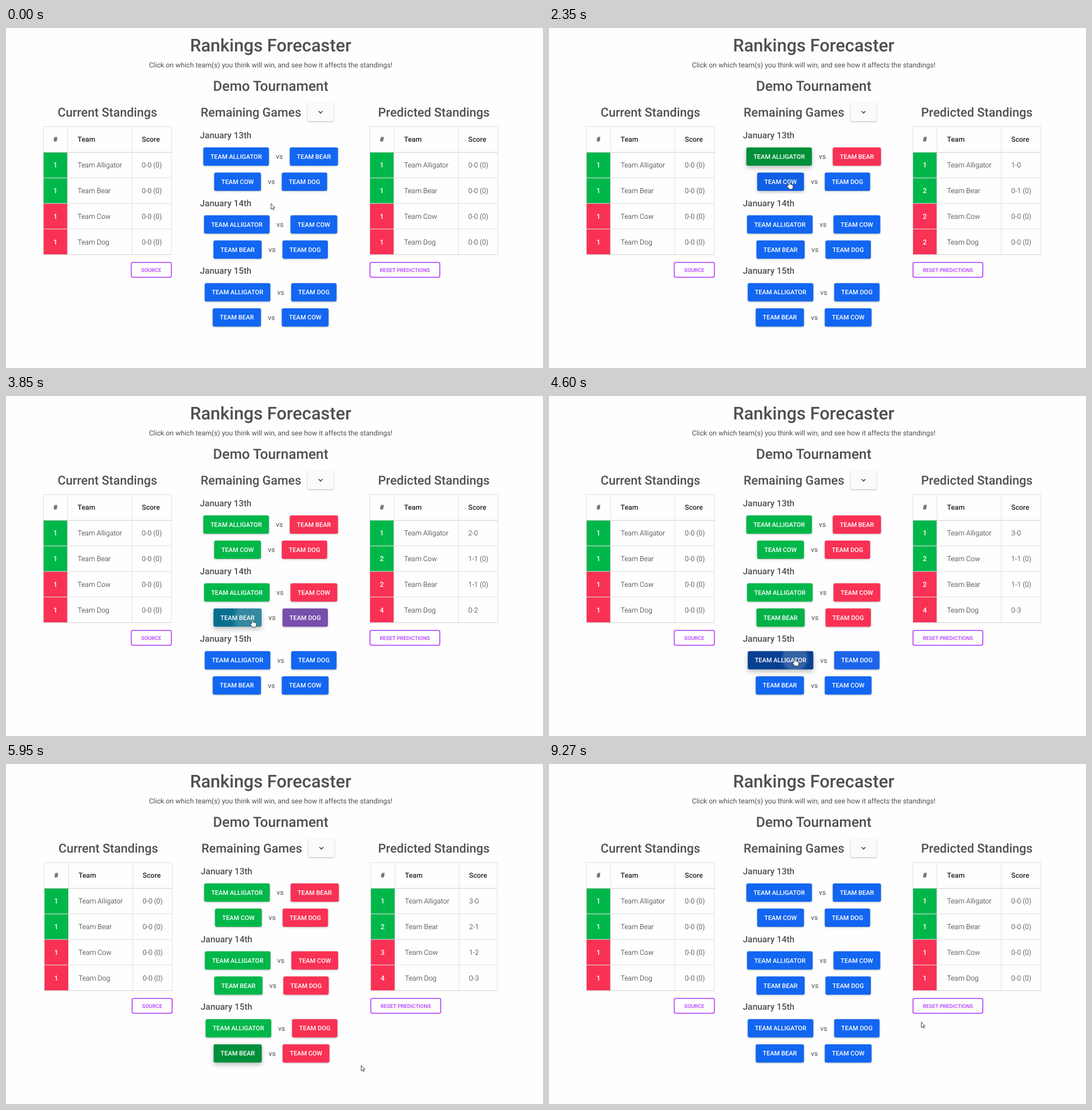
These frames come from a looping animation (941 by 595 pixels, 9940 ms). An HTML page:

```html
<!DOCTYPE html>
<html lang="en">
<head>
<meta charset="utf-8">
<title>Rankings Forecaster</title>
<style>
  html, body { margin: 0; width: 100%; height: 100%; overflow: hidden; background: #fefefe; }
  svg { display: block; font-family: Roboto, sans-serif; text-rendering: geometricPrecision; }
</style>
</head>
<body>
<svg id="stage" width="941" height="595" viewBox="0 0 941 595"></svg>
<script>
const LOOP = 9940;
const INK = '#4f4f4f', DARK = '#212529', LINE = '#dfdfdf', VIOLET = '#b23cfd';
const GREEN = [0, 183, 74], RED = [249, 49, 84], BLUE = [18, 102, 241];
const DARK_GREEN = [0, 143, 58], DARK_BLUE = [12, 86, 208];

const TEAMS = ['Alligator', 'Bear', 'Cow', 'Dog'];
const BUTTON_WIDTH = { Alligator: 115, Bear: 84.5, Cow: 82, Dog: 79.5 };
// The first team of each game is the one that gets picked.
const GAMES = [
  ['Alligator', 'Bear'], ['Cow', 'Dog'],
  ['Alligator', 'Cow'], ['Bear', 'Dog'],
  ['Alligator', 'Dog'], ['Bear', 'Cow'],
];

// Times in ms
const HOVER = [1070, 2290, 2900, 3510, 4050, 4910];
const PRESS = [1510, 2400, 3170, 3660, 4470, 5090];
const HOLD = 125, FADE = 150, RIPPLE = 500;
const RESET_HOVER = 7800, RESET_PRESS = 8410, RESET = RESET_PRESS + HOLD;

// Cursor moves: start, end, x, y
const CURSOR_START = [464, 307];
const MOVES = [
  [620, 1190, 420.5, 240.5],
  [2170, 2390, 421, 271],
  [2780, 3000, 432, 341],
  [3400, 3620, 432, 391],
  [3900, 4150, 431, 459],
  [4760, 5040, 427.5, 498.5],
  [5490, 5950, 622, 527],
  [7050, 7920, 655, 426],
  [8800, 9270, 652, 451],
];

const ramp = (t, start, length) => Math.min(1, Math.max(0, (t - start) / length));
const ease = k => k * k * (3 - 2 * k);
const mix = (a, b, k) => a + (b - a) * k;
const mixColor = (a, b, k) => a.map((v, i) => mix(v, b[i], k));
const rgb = c => `rgb(${c.map(Math.round)})`;

// Text is placed by the middle of its capitals.
function label(str, x, middle, size, weight = 500, fill = INK, anchor = 'middle') {
  return `<text x="${x}" y="${middle + size * .355}" font-size="${size}" font-weight="${weight}" fill="${fill}" text-anchor="${anchor}">${str}</text>`;
}

function rect(x, y, w, h, fill, extra = '') {
  return `<rect x="${x}" y="${y}" width="${w}" height="${h}" fill="${fill}" ${extra}/>`;
}

function raised(x, y, w, h, fill, lift = 0) {
  const shadow = `drop-shadow(0 ${mix(1.5, 4, lift)}px ${mix(1.8, 4, lift)}px rgba(0,0,0,${mix(.27, .25, lift)}))`;
  return rect(x, y, w, h, fill, `rx="3" style="filter:${shadow}"`);
}

// Standings after each pick; ties keep their previous order.
function simulate() {
  let rows = TEAMS.map(team => ({ team, wins: 0, losses: 0 }));
  const history = [rows];
  for (const [winner, loser] of GAMES) {
    rows = rows.map(r => ({
      team: r.team,
      wins: r.wins + (r.team === winner),
      losses: r.losses + (r.team === loser),
    })).sort((a, b) => b.wins - a.wins);
    history.push(rows);
  }
  return history;
}
const HISTORY = simulate();

function table(left, width, rows) {
  const top = 172.5, head = 45, rowHeight = 44.75;
  const bottom = top + head + 4 * rowHeight;
  const textX = left + 60, scoreX = left + 172.5, rankX = left + 21;
  let out = label('#', rankX, 195, 12.3, 500, DARK)
    + label('Team', textX, 195, 12.3, 500, DARK, 'start')
    + label('Score', scoreX, 195, 12.3, 500, DARK, 'start');
  let lines = `M${left} ${top}h${width}V${bottom}h${-width}Z M${left + 42.5} ${top}V${bottom}M${left + 155} ${top}V${bottom}`;
  rows.forEach((row, i) => {
    const y = top + head + i * rowHeight, middle = y + 22.5;
    const rank = 1 + rows.filter(r => r.wins > row.wins).length;
    const tied = rows.filter(r => r.wins === row.wins).length > 1;
    out += rect(left, y, 42, rowHeight, rgb(i < 2 ? GREEN : RED))
      + label(rank, rankX, middle, 12.3, 500, '#fff')
      + label('Team ' + row.team, textX, middle, 12.3, 300, DARK, 'start')
      + label(`${row.wins}-${row.losses}${tied ? ' (0)' : ''}`, scoreX, middle, 12.3, 300, DARK, 'start');
    lines += `M${left} ${y}h${width}`;
  });
  return out + `<path d="${lines}" fill="none" stroke="${LINE}"/>`
    + `<path d="M${left} ${top + head}h${width}M${left} ${bottom}h${width}" stroke="#cfcfcf"/>`;
}

function outlineButton(str, box, tint = 0) {
  const { x, y, w, h } = box;
  return rect(x + .8, y + .8, w - 1.6, h - 1.6, `rgba(0,0,0,${.03 * tint})`, `rx="2.6" stroke="${VIOLET}" stroke-width="1.6"`)
    + label(str, x + w / 2, y + h / 2, 9.25, 500, VIOLET);
}

function gameBoxes(i, shift) {
  const [a, b] = GAMES[i].map(team => BUTTON_WIDTH[team]);
  const x = 463.75 + shift - (a + 36.5 + b) / 2;
  const y = 209 + Math.floor(i / 2) * 118.75 + (i % 2) * 44;
  return [{ x, y, w: a, h: 32 }, { x: x + a + 36.5, y, w: b, h: 32 }];
}

function ripple(t, start, box, color, strength) {
  const age = t - start;
  if (age < 0 || age > RIPPLE) return '';
  const [x, y] = cursorAt(start);
  const opacity = strength * (1 - ramp(age, RIPPLE * .5, RIPPLE * .5));
  return `<clipPath id="clip${start}"><rect x="${box.x}" y="${box.y}" width="${box.w}" height="${box.h}" rx="3"/></clipPath>
    <radialGradient id="glow${start}"><stop offset=".75" stop-color="${color}"/><stop offset="1" stop-color="${color}" stop-opacity="0"/></radialGradient>
    <circle cx="${x}" cy="${y}" r="${age * .195}" fill="url(#glow${start})" opacity="${opacity}" clip-path="url(#clip${start})"/>`;
}

function game(t, i, boxes) {
  const press = PRESS[i], release = press + HOLD;
  const blur = PRESS[i + 1] ?? RESET_PRESS;
  const picked = ramp(t, release, FADE) * (1 - ramp(t, RESET, FADE));
  const focus = ramp(t, HOVER[i], FADE) * (1 - ramp(t, blur, FADE));
  const active = ramp(t, press, 120) * (1 - ramp(t, release, 60));
  const normal = mixColor(BLUE, GREEN, picked), dark = mixColor(DARK_BLUE, DARK_GREEN, picked);
  const fills = [
    mixColor(normal, dark, focus).map(v => v * (1 - .3 * active)),
    mixColor(BLUE, RED, picked),
  ];
  const middle = boxes[0].y + 16;
  let out = label('vs', boxes[1].x - 18.25, middle, 12.3, 400);
  boxes.forEach(({ x, y, w, h }, side) => {
    out += raised(x, y, w, h, rgb(fills[side]), side ? 0 : focus);
    if (!side) out += ripple(t, press, boxes[0], '#fff', .18);
    out += label('TEAM ' + GAMES[i][side].toUpperCase(), x + w / 2, middle, 11, 500, '#fff');
  });
  return out;
}

function cursorAt(t) {
  let [x, y] = CURSOR_START;
  for (const [start, end, toX, toY] of MOVES) {
    const k = ease(ramp(t, start, end - start));
    x = mix(x, toX, k);
    y = mix(y, toY, k);
  }
  return [x, y];
}

function cursor(t, boxes) {
  const [x, y] = cursorAt(t);
  const pointing = boxes.some(b => x >= b.x && x <= b.x + b.w && y >= b.y && y <= b.y + b.h);
  const pressed = [...PRESS, RESET_PRESS].some(p => t >= p && t < p + HOLD);
  const shape = pointing
    ? 'M-1.2 7V1.6a1.1 1.1 0 0 1 2.2 0V5.2c.6-.6 1.8-.4 2 .4 .7-.4 1.8-.2 2 .6 .9-.2 1.7.3 1.7 1.3V10L5.6 13.6H0L-3.8 8.8c-.5-1 .8-1.8 1.6-1.2Z'
    : 'M.4.4V10.2L2.6 8.2 4.2 11.4 5.6 10.8 4.1 7.6H7.2Z';
  return (pressed ? `<circle cx="${x}" cy="${y}" r="8" fill="#ffe100" opacity=".6"/>` : '')
    + `<path transform="translate(${x} ${y})" d="${shape}" fill="#fff" stroke="#333" stroke-width=".9" stroke-linejoin="round"/>`;
}

function render(t) {
  const picks = t >= RESET ? 0 : PRESS.filter(p => t >= p + HOLD).length;
  const done = picks === GAMES.length;
  const shift = done ? 1.5 : 0;
  const games = GAMES.map((_, i) => gameBoxes(i, shift));
  const reset = { x: 637 + shift, y: 409.5, w: 124, h: 27.5 };
  const source = { x: 218.7 + shift, y: 409.5, w: 71.8, h: 27.5 };
  const resetTint = ramp(t, RESET_HOVER, FADE) * (1 - ramp(t, 8950, FADE));

  return label('Rankings Forecaster', 463.8, 30, 30.8)
    + label('Click on which team(s) you think will win, and see how it affects the standings!', 463.8, 64.5, 12.3, 400)
    + label('Demo Tournament', 463.8, 101, 24.6)
    + label('Current Standings', 177.7 + shift, 147, 21.6)
    + label('Remaining Games', 429.2 + shift, 147, 21.6)
    + label('Predicted Standings', 749.7, 147, 21.6)
    + raised(528.5 + shift, 131, 45.5, 32, '#fbfbfb')
    + `<path d="M${547.8 + shift} 145.6l3.4 3.4 3.4-3.4" fill="none" stroke="#333" stroke-width="1.4"/>`
    + table(65.5, 224.5, HISTORY[0]).replace(/^/, `<g transform="translate(${shift})">`) + '</g>'
    + table(637.5 + shift, done ? 222 : 224.5, HISTORY[picks])
    + outlineButton('SOURCE', source)
    + outlineButton('RESET PREDICTIONS', reset, resetTint)
    + ripple(t, RESET_PRESS, reset, '#000', .12)
    + [13, 14, 15].map((day, i) => label(`January ${day}th`, 339.8 + shift, 187.5 + i * 118.75, 15.4, 500, INK, 'start')).join('')
    + games.map((boxes, i) => game(t, i, boxes)).join('')
    + cursor(t, [...games.flat(), reset, source]);
}

const stage = document.getElementById('stage');
const start = performance.now();
function frame() {
  stage.innerHTML = render((performance.now() - start) % LOOP);
  requestAnimationFrame(frame);
}
frame();
</script>
</body>
</html>
```
